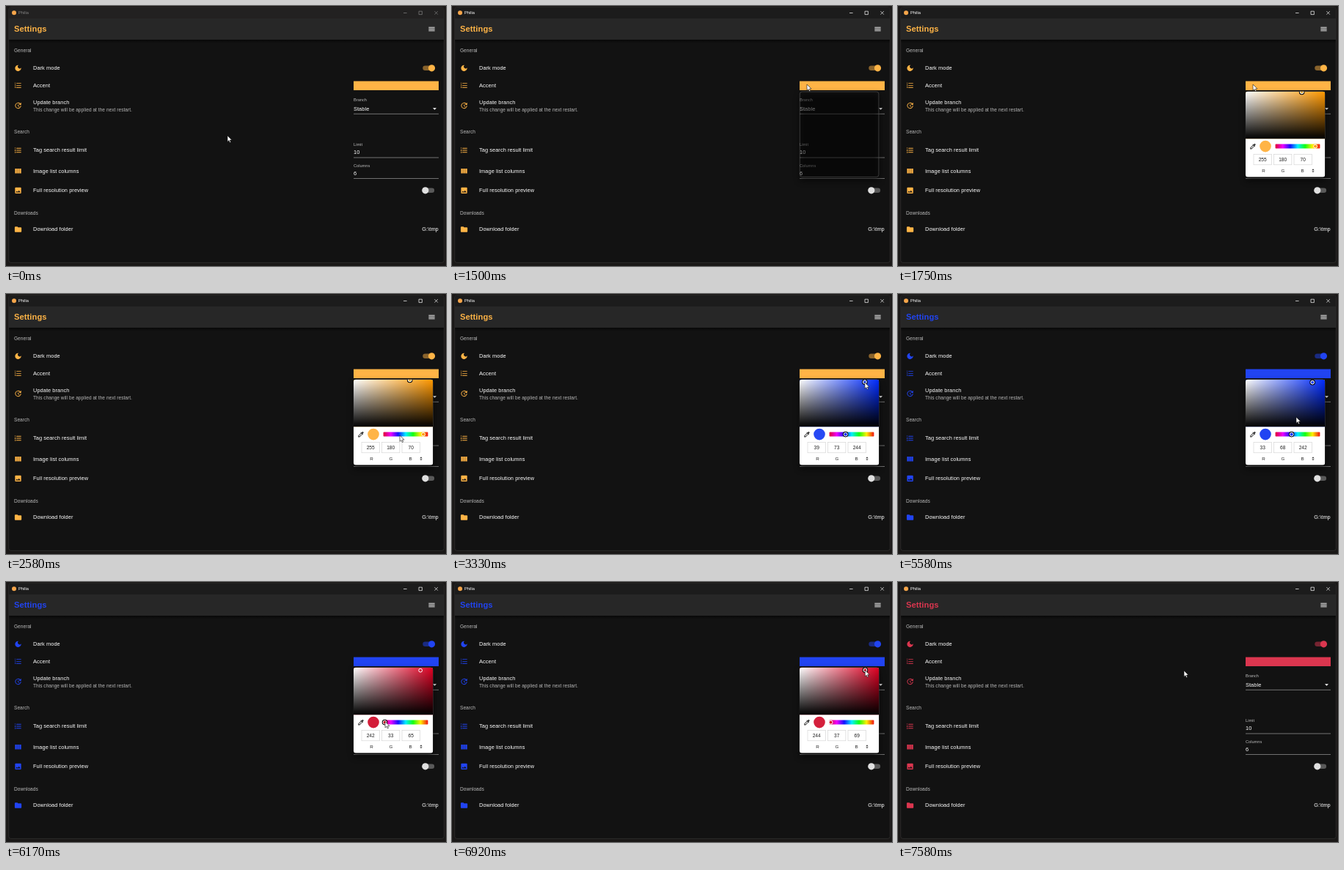
These frames come from a looping animation (600x355 px, 8000 ms). An HTML page:

```html
<!DOCTYPE html>
<html lang="en">
<head>
<meta charset="utf-8">
<title>Settings</title>
<style>
  html, body { margin: 0; width: 100%; height: 100%; overflow: hidden; background: #1a1817; }
  svg { display: block; width: 100%; height: 100%; font-family: "Liberation Sans", Arial, sans-serif; }
  .item { font-size: 7.4px; letter-spacing: .00938em; fill: #fff; }
  .head { font-size: 6.5px; letter-spacing: .01em; fill: #bcbcbc; }
  .note { font-size: 6.475px; letter-spacing: .01071em; fill: #b8b8b8; }
  .label { font-size: 5.55px; letter-spacing: .00938em; fill: #c0c0c0; }
  .num { font-size: 6.6px; fill: #222; text-anchor: middle; }
  .unit { font-size: 6.2px; fill: #222; text-anchor: middle; }
  .accent { fill: var(--accent); }
</style>
</head>
<body>
<svg id="stage" viewBox="0 0 600 355"></svg>
<script>
const LOOP = 8000, STEP = 1000 / 12;
const OPEN_1 = 1500, CLOSE_1 = 4080, OPEN_2 = 5330, CLOSE_2 = 7500;
const ACTIVE = 1420;

const list = "M2 17h2v.5H3v1h1v.5H2v1h3v-4H2zM3 8h1V4H2v1h1zM2 11h1.8L2 13.1v.9h3v-1H3.2L5 10.9V10H2zM7 5v2h14V5zM7 19h14v-2H7zM7 13h14v-2H7z";
const icons = {
  moon: "M12 3a9 9 0 1 0 8.9 7.64A5.4 5.4 0 1 1 13.36 3.1 9 9 0 0 0 12 3z",
  list,
  update: "M11 8v5l4.25 2.52.77-1.28-3.52-2.09V8zM21 10V3l-2.64 2.64A9 9 0 1 0 21 12h-2a7 7 0 1 1-2.05-4.95L14 10z",
  columns: "M3 5h5.33v14H3zM9.33 5h5.34v14H9.33zM15.67 5H21v14h-5.33z",
  image: "M21 19V5a2 2 0 0 0-2-2H5a2 2 0 0 0-2 2v14a2 2 0 0 0 2 2h14a2 2 0 0 0 2-2zM8.5 13.5l2.5 3.01L14.5 12l4.5 6H5z",
  folder: "M10 4H4a2 2 0 0 0-2 2v12a2 2 0 0 0 2 2h16a2 2 0 0 0 2-2V8a2 2 0 0 0-2-2h-8z",
  menu: "M3 6h18v2H3zM3 11h18v2H3zM3 16h18v2H3z",
  dropper: "M20.7 5.6l-2.3-2.3a1 1 0 0 0-1.4 0l-3.1 3.1L12 4.5l-1.4 1.4L12 7.3l-9 9V21h4.7l9-9 1.4 1.4 1.4-1.4-1.9-1.9 3.1-3.1a1 1 0 0 0 0-1.4zM6.9 19L5 17.1l8.1-8 1.9 1.8z"
};

const text = (x, y, s, cls, extra = "") => `<text x="${x}" y="${y}" class="${cls}" ${extra}>${s}</text>`;
const rect = (x, y, w, h, extra) => `<rect x="${x}" y="${y}" width="${w}" height="${h}" ${extra}/>`;
const circle = (x, y, r, extra) => `<circle cx="${x}" cy="${y}" r="${r}" ${extra}/>`;
const icon = (name, x, y, extra = 'class="accent"', k = .4625) =>
  `<path d="${icons[name]}" transform="translate(${x - 12 * k} ${y - 12 * k}) scale(${k})" ${extra}/>`;
const row = (name, iconY, base, s) => icon(name, 16.5, iconY) + text(37, base, s, "item");
const field = (label, labelY, value, valueY, lineY) =>
  text(474, labelY, label, "label") + text(474, valueY, value, "item") +
  rect(474, lineY, 116, .6, 'fill="#b0b0b0"');
const toggle = (y, on) => rect(568.3, y - 3.25, 15.8, 6.5, `rx="3.25" opacity="${on ? .5 : .3}" ` + (on ? 'class="accent"' : 'fill="#fff"')) +
  circle(on ? 580.5 : 571.8, y, 4.6, on ? 'class="accent"' : 'fill="#e0e0e0"');
const stops = colors => colors.map((c, i) => `<stop offset="${i / (colors.length - 1)}" stop-color="${c}"/>`).join("");
const marker = id => `<g id="${id}">${circle(0, 0, 3.2, 'class="ring" fill="none" stroke="#000" stroke-width="1.2"')}
  ${circle(0, 0, 2.4, 'class="dot" stroke="#fff" stroke-width="1"')}</g>`;

const windowFrame = `
  ${rect(0, 0, 600, 355, 'fill="#1a1817"')}
  ${rect(3.7, 1.8, 593.6, 348.6, 'rx="3" fill="#121212" stroke="#3b3a39" stroke-width=".6"')}
  <path id="bar" d="M4 17V5q0-3 3-3h587q3 0 3 3v12z"/>
  ${circle(11, 9.3, 3, 'fill="#f5a54a"')}
  <g id="chrome">
    <text x="17" y="11.3" font-size="5.7">Philia</text>
    <path d="M542 9.5h4.6M563 7.2h4.4v4.4H563zM584.4 7.2l4.4 4.4M588.8 7.2l-4.4 4.4" fill="none" stroke-width=".7"/>
  </g>
  ${rect(4, 17, 593, 29, 'fill="#272727"')}
  ${rect(4, 46, 593, 5, 'fill="url(#under)"')}
  ${text(11, 35.4, "Settings", "accent", 'font-size="11.1" font-weight="700" letter-spacing=".1"')}
  ${icon("menu", 580.5, 31.5, 'fill="#fff"')}`;

const settings = `
  ${text(11, 63.4, "General", "head")}
  ${row("moon", 84.8, 87.3, "Dark mode")}${toggle(84.8, true)}
  ${row("list", 108.4, 110.7, "Accent")}${rect(474, 102.6, 116, 12.4, 'class="accent"')}
  ${row("update", 136, 134, "Update branch")}
  ${text(37, 144.2, "This change will be applied at the next restart.", "note")}
  ${field("Branch", 130.2, "Stable", 142.6, 146.9)}
  <path d="M582 139.2h5l-2.5 2.5z" fill="#fff"/>
  ${text(11, 173.7, "Search", "head")}
  ${row("list", 197, 199.3, "Tag search result limit")}${field("Limit", 191.3, "10", 202.3, 206.7)}
  ${row("columns", 225.3, 227.7, "Image list columns")}${field("Columns", 219.7, "6", 230.6, 235.1)}
  ${row("image", 251.8, 254, "Full resolution preview")}${toggle(251.8, false)}
  ${text(11, 284.9, "Downloads", "head")}
  ${row("folder", 305, 307.4, "Download folder")}
  ${text(589.8, 307.4, "G:\\tmp", "item", 'text-anchor="end"')}`;

const units = ["R", "G", "B"].map((u, i) => {
  const x = 485 + 27.5 * i;
  return rect(x, 202.6, 24.4, 14.2, 'fill="#fff" stroke="#cfcfcf" stroke-width=".6"') +
    text(x + 12.2, 212, "", "num") + text(498.5 + 26.5 * i, 226.9, u, "unit");
}).join("");

const picker = `
  <g id="shell">
    ${rect(474, 120, 109, 119, 'rx="4" fill="#000" opacity=".55" filter="url(#blur)"')}
    ${rect(474.3, 117, 107.6, 116.4, 'rx="3" fill="none" stroke="#5a5a5a" stroke-width=".6"')}
  </g>
  <g id="panel" clip-path="url(#round)">
    ${rect(474, 116.8, 108.2, 116.8, 'fill="#fff"')}
    ${rect(474, 116.8, 108.2, 64.4, 'id="hueFill"')}
    ${rect(474, 116.8, 108.2, 64.4, 'fill="url(#toWhite)"')}
    ${rect(474, 116.8, 108.2, 64.4, 'fill="url(#toBlack)"')}
    ${icon("dropper", 484, 191.6, 'fill="#333"', .42)}
    <circle id="swatch" cx="501" cy="191.6" r="7.8"/>
    ${rect(514.6, 188.6, 60.8, 6, 'rx=".8" fill="url(#hues)"')}
    ${marker("svMark")}${marker("hueMark")}
    ${units}
    <path d="M564.4 224.2h3.2l-1.6-1.9zM564.4 225.4h3.2l-1.6 1.9z" fill="#333"/>
  </g>`;

const stage = document.getElementById("stage");
stage.innerHTML = `
  <defs>
    <linearGradient id="under" x2="0" y2="1"><stop stop-color="#000" stop-opacity=".55"/><stop offset="1" stop-color="#000" stop-opacity="0"/></linearGradient>
    <linearGradient id="toWhite"><stop stop-color="#fff"/><stop offset="1" stop-color="#fff" stop-opacity="0"/></linearGradient>
    <linearGradient id="toBlack" x2="0" y2="1"><stop stop-color="#000" stop-opacity="0"/><stop offset="1" stop-color="#000"/></linearGradient>
    <linearGradient id="hues">${stops(["#e00030", "#e0f", "#11f", "#0ef", "#1f1", "#fe0", "#f01010"])}</linearGradient>
    <filter id="blur" x="-20%" y="-20%" width="140%" height="140%"><feGaussianBlur stdDeviation="4.5"/></filter>
    <clipPath id="round">${rect(474, 116.8, 108.2, 116.8, 'rx="3"')}</clipPath>
  </defs>
  ${windowFrame}${settings}${picker}
  <path id="cursor" d="M0 0V8.4L1.9 6.6 3.2 9.5 4.6 8.9 3.3 6.1H6z" fill="#fff" stroke="#111" stroke-width=".6"/>`;

const $ = id => document.getElementById(id);
const nums = stage.querySelectorAll(".num");

// Each key: [time, ...values]
const mouse = [
  [0, 302, 177], [333, 312, 172], [500, 312, 172], [1333, 484, 107], [2167, 484, 107],
  [2583, 537, 193], [2667, 537, 191], [2750, 537, 191], [3083, 552, 120], [3417, 565, 121],
  [3833, 565, 121], [4083, 394, 150], [4667, 394, 150], [5083, 541, 107], [5500, 541, 107],
  [5583, 543, 168], [5833, 537, 191], [6167, 517, 190.5], [6333, 517, 190.5],
  [6833, 565, 121], [7167, 554, 118], [7500, 390, 121]
];
const ORANGE = 60 * 110 / 185, BLUE = 240 - 60 * 35 / 209, RED = 360 - 60 * 32 / 209;
const hueKeys = [[0, ORANGE], [2583, ORANGE], [2667, BLUE], [5833, BLUE], [6167, RED]];
const svKeys = [
  [0, 185 / 255, 1], [3083, 185 / 255, 1], [3417, 209 / 242, 242 / 255],
  [6833, 209 / 242, 242 / 255], [7167, .755, .987]
];

function along(keys, t) {
  const next = keys.findIndex(k => k[0] > t);
  if (next < 0) return keys[keys.length - 1].slice(1);
  const a = keys[next - 1], b = keys[next];
  const u = (t - a[0]) / (b[0] - a[0]), e = u * u * (3 - 2 * u);
  return a.slice(1).map((v, i) => v + (b[i + 1] - v) * e);
}

function hsv(h, s, v) {
  return [5, 3, 1].map(n => {
    const k = (n + h / 60) % 6;
    return Math.round(255 * v * (1 - s * Math.max(0, Math.min(k, 4 - k, 1))));
  });
}
const css = c => `rgb(${c})`;
// Crimson tones are shown a little darker than their numbers.
const tone = h => h > 300 ? .87 : 1;

function colorAt(t) {
  const [h] = along(hueKeys, t), [s, v] = along(svKeys, t);
  return { h, s, v, rgb: hsv(h, s, v), shown: css(hsv(h, s, v * tone(h))) };
}

function panelOpacity(t) {
  if (t >= OPEN_2 && t < CLOSE_2) return 1;
  if (t < OPEN_1 || t >= CLOSE_1) return 0;
  return [0, .4, .85, 1][Math.min(3, Math.floor((t - OPEN_1 + 8) / STEP))];
}

function place(id, x, y, focused, fill) {
  const g = $(id);
  g.setAttribute("transform", `translate(${x} ${y})`);
  g.querySelector(".ring").setAttribute("opacity", focused ? 1 : 0);
  g.querySelector(".dot").setAttribute("fill", fill);
}

function draw(time) {
  const t = Math.floor((time + 4) / STEP) * STEP;
  const [mx, my] = along(mouse, t);
  $("cursor").setAttribute("transform", `translate(${mx} ${my})`);

  const active = t >= ACTIVE - 5;
  $("bar").setAttribute("fill", active ? "#1c1c1c" : "#222121");
  const ink = active ? "#fff" : "#858585";
  $("chrome").setAttribute("fill", ink);
  $("chrome").setAttribute("stroke", "none");
  $("chrome").querySelector("path").setAttribute("stroke", ink);

  const applied = t < CLOSE_1 ? 0 : t < CLOSE_2 - 5 ? CLOSE_1 : CLOSE_2;
  stage.style.setProperty("--accent", colorAt(applied).shown);

  const open = (t >= OPEN_1 - 5 && t < CLOSE_1) || (t >= OPEN_2 && t < CLOSE_2 - 5);
  $("shell").setAttribute("opacity", open ? 1 : 0);
  $("panel").setAttribute("opacity", open ? panelOpacity(t) : 0);
  if (!open) return;

  const c = colorAt(t);
  const pure = css(hsv(c.h, 1, tone(c.h)));
  const onHue = (t > 2660 && t < 3000) || (t > 5830 && t < 6750);
  $("hueFill").setAttribute("fill", pure);
  $("swatch").setAttribute("fill", c.shown);
  place("svMark", 474.5 + 105 * c.s, 117.4 + 64 * (1 - c.v), !onHue, c.shown);
  place("hueMark", 575 - c.h / 6, 191.6, onHue || Math.abs(c.h - BLUE) < 1, pure);
  nums.forEach((n, i) => n.textContent = c.rgb[i]);
}

const start = performance.now();
function tick() {
  draw((performance.now() - start) % LOOP);
  requestAnimationFrame(tick);
}
tick();
</script>
</body>
</html>
```
